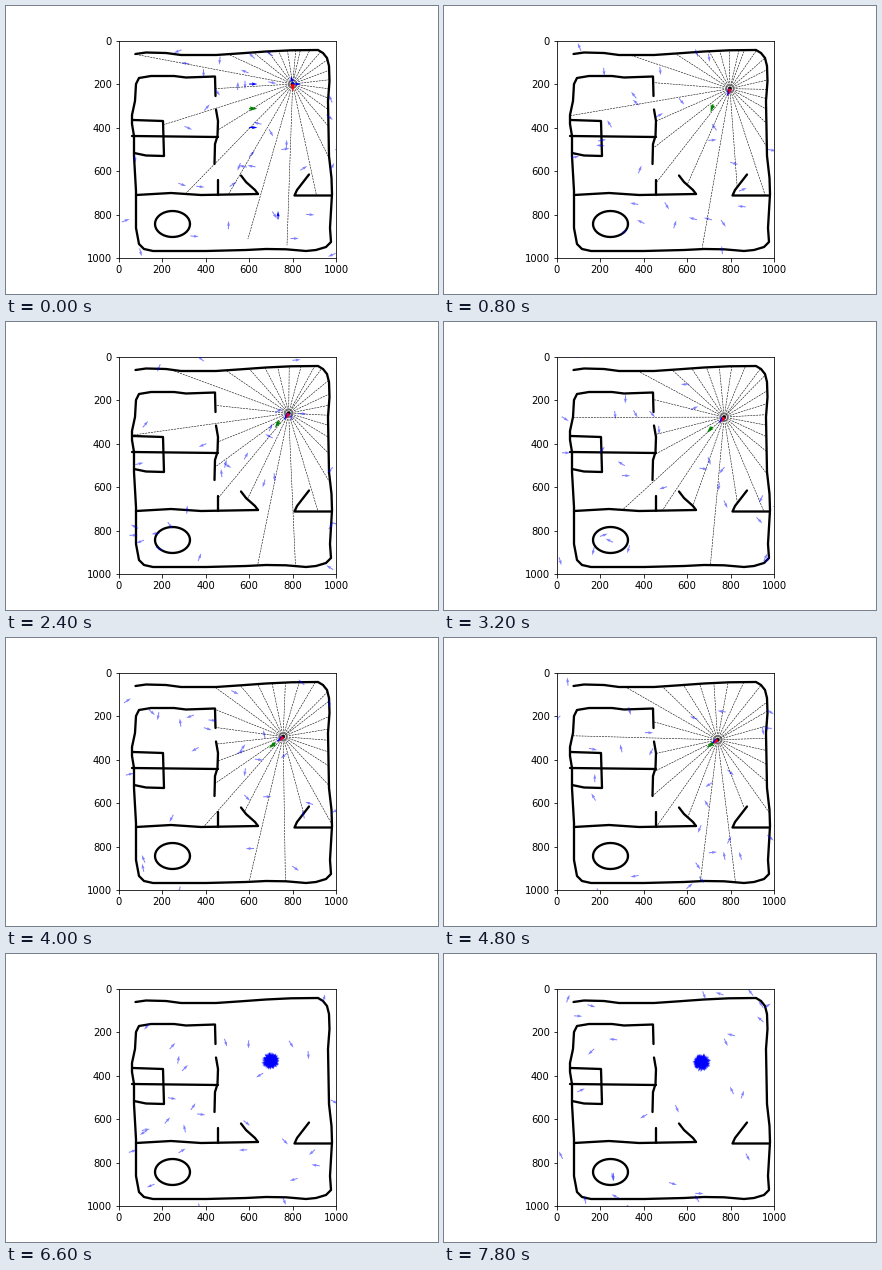
A matplotlib script that plays this animation: 432 by 288 pixels, repeating every 8000 ms.

```python
import numpy as np
import matplotlib.pyplot as plt
from matplotlib.animation import FuncAnimation

plt.rcParams.update({"figure.subplot.bottom": 0.125, "figure.subplot.top": 0.88,
                     "figure.subplot.left": 0.125, "figure.subplot.right": 0.9,
                     "font.family": "DejaVu Sans", "font.size": 10})

FRAMES, INTERVAL = 40, 200
SCALE = 0.21744                      # pixels per map unit
CORNER = np.array([112.68, 34.56])   # stage position of the map origin
LENGTH = 38                          # arrow length in map units
MAX_RANGE = 742
RAY_STEP = 14.1

# Floor plan in stage pixels, one polyline per wall.
OUTER = [(129.5, 48), (140, 46.5), (160, 47), (175, 49), (210, 49), (235, 47.3),
         (260, 45.5), (285, 44.3), (312, 44), (317, 47), (321, 52), (323, 60),
         (323.5, 75), (322, 95), (323, 150), (325.5, 172), (326, 188),
         (324, 222), (325, 236), (320, 241), (310, 244), (300, 245),
         (280, 243.3), (260, 243), (240, 244), (200, 245), (147, 245),
         (138, 243), (133, 238), (130, 222), (130, 185), (128, 150),
         (128, 130), (126, 118), (126, 109), (129, 95), (130, 78), (133, 72),
         (145, 70), (168, 70), (180, 71.5), (209, 70.5), (209.5, 90)]
INNER = [
    [(210, 103.5), (212, 115), (211.5, 130), (209, 138), (208.5, 158)],
    [(212, 174), (212, 189)],
    [(130, 189), (165, 187), (195, 189), (252, 188)],
    [(235, 169.5), (240, 176), (249, 184), (252, 188)],
    [(325, 189.5), (288.5, 189.5), (291, 184), (303, 168.5)],
    [(127, 114), (157, 115), (158, 150), (140, 149.5), (128, 147)],
    [(126, 130), (212, 131)],
]


def to_map(points):
    return (np.array(points, float) - CORNER) / SCALE


turn = np.linspace(0, 2 * np.pi, 40)
table = np.c_[166.5 + 17.5 * np.cos(turn), 218 + 13 * np.sin(turn)]
walls = [to_map(w) for w in [OUTER, *INNER, table]]
seg_a = np.vstack([w[:-1] for w in walls])
seg_d = np.vstack([np.diff(w, axis=0) for w in walls])


def direction(deg):
    """Unit vector; 0 points down the map, 90 points left."""
    a = np.radians(deg)
    return np.stack([-np.sin(a), np.cos(a)], axis=-1)


def cross(u, v):
    return u[..., 0] * v[..., 1] - u[..., 1] * v[..., 0]


def cast(pos, deg):
    """End point of a range beam."""
    d = direction(deg)
    den = cross(d, seg_d)
    den = np.where(np.abs(den) < 1e-9, 1e-9, den)
    rel = seg_a - pos
    t = cross(rel, seg_d) / den
    u = cross(rel, d) / den
    hits = t[(t > 0) & (u >= 0) & (u <= 1)]
    return pos + d * min(hits.min(initial=MAX_RANGE), MAX_RANGE)


def pose(k):
    """Robot position and heading along its arc."""
    heading = 2 + 1.97 * k
    a0, a1 = np.radians([5, heading + 3])
    x = 800 - 155 * (np.cos(a0) - np.cos(a1))
    y = 200 + 155 * (np.sin(a1) - np.sin(a0))
    return np.array([x, y]), heading


fig, ax = plt.subplots(figsize=(6, 4), dpi=72)
ax.set(xlim=(0, 1000), ylim=(1000, 0), aspect="equal")
ax.set_xticks(range(0, 1001, 200))
ax.set_yticks(range(0, 1001, 200))
for w in walls:
    ax.plot(*w.T, color="black", lw=2.3, solid_joinstyle="round",
            solid_capstyle="round", zorder=1)

drawn = []


def arrows(pos, deg, color, width=1.0, length=LENGTH, alpha=1, z=3):
    pos = np.atleast_2d(pos)
    d = direction(np.atleast_1d(deg)) * length
    drawn.append(ax.quiver(pos[:, 0], pos[:, 1], d[:, 0], d[:, 1], color=color,
                           alpha=alpha, angles="xy", scale_units="xy", scale=1,
                           units="dots", width=width, zorder=z))


def beams(pos, heading):
    for i in range(-12, 14):
        end = cast(pos, heading + i * RAY_STEP)
        drawn.extend(ax.plot(*np.array([pos, end]).T, "--", color="black",
                             lw=0.55, zorder=2))


def clear():
    while drawn:
        drawn.pop().remove()
    return []


def draw(k):
    clear()
    rng = np.random.default_rng(100 + k)
    pos, heading = pose(k)

    n = 38 if k == 0 else 29
    arrows(rng.uniform(0, 1000, (n, 2)), rng.uniform(0, 360, n), "blue", alpha=0.5)

    if k % 2:
        # particles scattered about the pose after the motion step
        m = 160
        arrows(pos + rng.normal(0, 3, (m, 2)), rng.uniform(0, 360, m),
               "blue", alpha=0.5)
        return drawn

    beams(pos, heading)
    if k == 0:
        starts = [(600, 200), (600, 400), (733, 822), (800, 200), (800, 200)]
        arrows(starts, [270, 270, 180, 270, 170], "blue", 1.1)
        mean, mean_dir = np.array([600, 313]), 270
    else:
        pull = np.interp(k, [4, 12, 16, 24, 38], [0.26, 0.15, 0.2, 0.08, 0.14])
        mean, mean_dir = pos + pull * (500 - pos), heading + 8
        arrows(pos, heading + 10, "blue", 1.5)
    arrows(mean, mean_dir, "green", 1.5, z=4)
    arrows(pos, heading - 4, "red", 1.6, length=36 if k == 0 else 28, z=5)
    return drawn


anim = FuncAnimation(fig, draw, frames=FRAMES, init_func=clear,
                     interval=INTERVAL, repeat=True, repeat_delay=0, blit=False)
plt.show()
```
